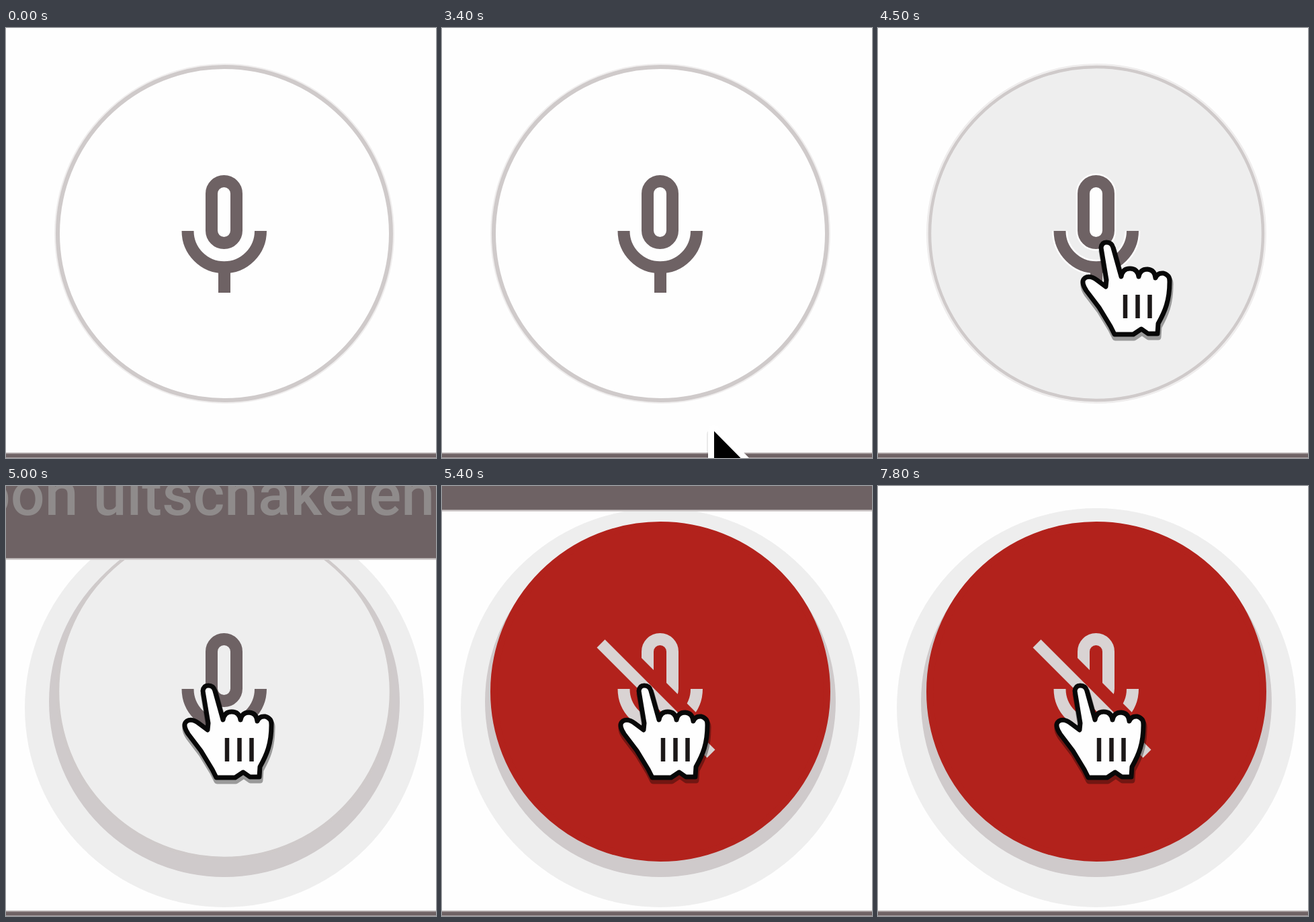
Animation of 640 by 640 pixels, one loop 8 s. Source, as an HTML page:

```html
<!DOCTYPE html>
<html lang="nl">
<head>
<meta charset="utf-8">
<title>Microphone button</title>
<style>
  html, body { margin: 0; width: 100%; height: 100%; overflow: hidden; background: #fefefe; }
  svg { display: block; width: 100vw; height: 100vh; }
  text { font: 500 89.5px Roboto, "Noto Sans", sans-serif; }
</style>
</head>
<body>
<svg viewBox="0 0 640 640">
  <defs>
    <clipPath id="above"><path d="M200 159L440 399V150H200Z"/></clipPath>
    <clipPath id="below"><path d="M200 198L440 438H200Z"/></clipPath>
    <path id="capsule" d="M306 246.500a18.500 18.500 0 0 1 37 0V301.500a18.500 18.500 0 0 1-37 0Z"/>
    <path id="cradle" d="M270.500 302a54.250 54.250 0 0 0 108.500 0"/>
    <path id="stem" d="M325 358V394"/>
    <path id="palm" d="M-8 9Q-7 1 0 1Q8 1 10 9L22 52Q24 40 35 40Q46 40 48 52Q50 41 61 41Q72 42 73 54Q76 46 85 47Q95 50 94 60C94 88 87 104 77 122L76 137H62L52 130L40 138H12L6 126L-11 98L-30 73Q-39 59 -32 54Q-24 49 -13 58L-1 67L0 57Z"/>
    <path id="pointer" d="M0 0V102L23 80L38 114L55 107L41 74H73Z"/>
  </defs>
  <rect width="640" height="640" fill="#fefefe"/>
  <g id="shadow">
    <circle cx="325" cy="330" r="297" fill="#eee"/>
    <circle cx="325" cy="321" r="261" fill="#cfcacb"/>
  </g>
  <circle id="halo" cx="325" cy="306" r="248" fill="none" stroke="#efeded" stroke-width="10"/>
  <circle id="button" cx="325" cy="306" r="248"/>
  <g id="micOn" fill="none" stroke="#6e6264" stroke-width="18">
    <g id="glow" stroke="#fefefe" stroke-width="23">
      <use href="#cradle"/><use href="#capsule" fill="#fefefe"/>
    </g>
    <use href="#cradle"/><use href="#stem"/><use href="#capsule"/>
  </g>
  <g id="micOff" fill="none" stroke-width="18">
    <g clip-path="url(#above)"><use href="#capsule"/><use href="#cradle"/></g>
    <g clip-path="url(#below)"><use href="#cradle"/><use href="#stem"/></g>
    <path d="M236.500 234.500L400.500 398.500" stroke-width="17"/>
  </g>
  <rect y="632" width="640" height="8" fill="#a8a0a1"/>
  <rect y="634" width="640" height="5" fill="#6e6264"/>
  <g id="tip">
    <rect y="-200" width="640" height="310" fill="#d0cbcb"/>
    <rect y="-200" width="640" height="307.500" fill="#6e6264"/>
    <text x="638" y="43" text-anchor="end" fill="#8f8b8b">Microfoon uitschakelen</text>
  </g>
  <g id="arrow" stroke-linejoin="round">
    <use href="#pointer" x="-3" y="5" stroke="#000" stroke-width="16" opacity=".08"/>
    <use href="#pointer" stroke="#fff" stroke-width="18" paint-order="stroke"/>
  </g>
  <g id="hand" stroke-linejoin="round">
    <use href="#palm" x="1" y="5" stroke="#000" stroke-width="9" opacity=".35"/>
    <use href="#palm" fill="#fefefe" stroke="#080808" stroke-width="7"/>
    <path d="M28 79V114M46.500 79V114M64.500 79V114" stroke="#1c1818" stroke-width="6.500"/>
  </g>
</svg>
<script>
const LOOP = 8000, STEP = 100;
const $ = id => document.getElementById(id);
const set = (id, attrs) => {
  for (const k in attrs) $(id).setAttribute(k, attrs[k]);
};
const show = (id, on) => set(id, { visibility: on ? 'visible' : 'hidden' });
const ramp = (t, a, b) => Math.min(1, Math.max(0, (t - a) / (b - a)));
const mix = (a, b, p) => a + (b - a) * p;
const blend = (a, b, p) => `rgb(${a.map((v, i) => Math.round(mix(v, b[i], p)))})`;

const WHITE = [254, 254, 254], GREY = [238, 238, 238];
const PINK = [210, 157, 152], RED = [178, 34, 28];
const RING = [207, 202, 202], DARK = [110, 98, 100], PALE = [217, 211, 211];

// time, x, y of the pointer tip
const PATH = [
  [3400, 405, 600], [3500, 394, 535], [3700, 372, 427], [4000, 364, 320],
  [4200, 362, 287], [4500, 340, 318], [4800, 310, 300], [5000, 301, 296]
];

function pointer(t) {
  if (t >= PATH.at(-1)[0]) return PATH.at(-1).slice(1);
  const i = Math.max(1, PATH.findIndex(p => p[0] > t));
  const [a, b] = [PATH[i - 1], PATH[i]], p = ramp(t, a[0], b[0]);
  return [mix(a[1], b[1], p), mix(a[2], b[2], p)];
}

function buttonFill(t) {
  if (t < 5000) return blend(WHITE, GREY, ramp(t, 4200, 4500));
  if (t < 5200) return blend(GREY, PINK, ramp(t, 5000, 5200));
  return blend(PINK, RED, ramp(t, 5200, 5400));
}

function draw(t) {
  const hover = ramp(t, 4200, 4500);
  const press = ramp(t, 4600, 4900);
  const muted = t >= 5100;
  const fill = buttonFill(t);

  set('shadow', { opacity: press });
  set('halo', { opacity: 1 - press });
  set('button', {
    fill,
    stroke: muted ? fill : blend(RING, RING, 0),
    'stroke-width': muted ? 10 : mix(6, 4.5, hover)
  });

  show('micOn', !muted);
  show('micOff', muted);
  set('glow', { opacity: 1 - press });
  set('micOff', { stroke: blend(DARK, PALE, ramp(t, 5200, 5400)) });

  set('tip', {
    opacity: ramp(t, 4800, 5000) * (1 - ramp(t, 5700, 6000)),
    transform: `translate(0 ${t < 5100 ? 0 : -72})`
  });

  const at = { transform: `translate(${pointer(t)})` };
  set('arrow', at);
  set('hand', at);
  show('arrow', t >= 3400 && t < 3600);
  show('hand', t >= 3600);
}

const start = performance.now();
function tick() {
  const t = (performance.now() - start) % LOOP;
  draw(Math.floor(t / STEP) * STEP);
  requestAnimationFrame(tick);
}
tick();
</script>
</body>
</html>
```
